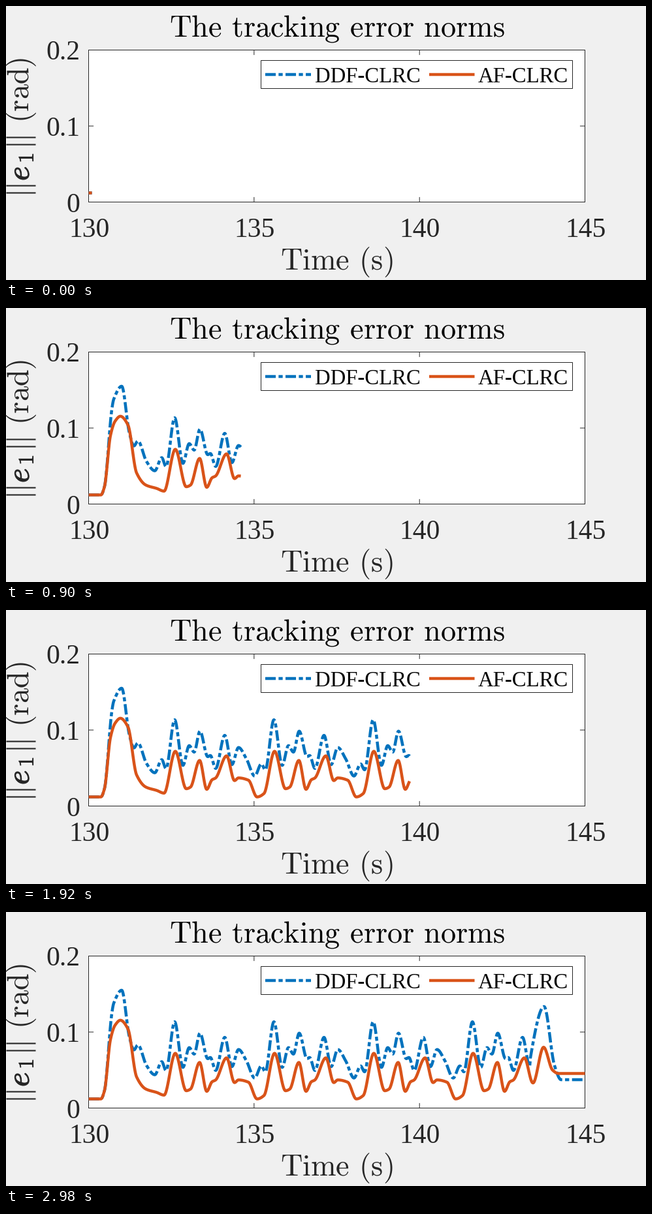
A matplotlib script that plays this animation: 980 px wide and 420 px high, repeating every 3 s.

```python
import numpy as np
import matplotlib.pyplot as plt
from matplotlib.animation import FuncAnimation
from matplotlib.patches import Rectangle
from matplotlib.patheffects import withStroke

W, H, DPI = 980, 420, 100
FRAMES, INTERVAL = 150, 20
LEFT, RIGHT, TOP, BOTTOM = 126.5, 886.5, 67.5, 300.5
SPAN, TOP_VALUE = 15, 0.2     # seconds and radians across the plot
PERIOD, CYCLES = 3, 4         # the tracked motion repeats every 3 s
SUB = 10                      # curve samples per frame
INK, BLUE, RED = "#262626", "#0072BD", "#D95319"
PX = 72 / DPI                 # one pixel in points
CURVE = 3.25
DASHDOT = (0, (3.55, 0.96, 1.4, 0.96))

plt.rcParams.update({
    "font.family": "Liberation Serif",
    "mathtext.fontset": "cm",
    "path.simplify": False,
})

# Turning points as (seconds after 130, radians)
REST = [(0, 0.012), (0.37, 0.012), (0.48, 0.023)]

RED_RISE = [(0.66, 0.09), (0.8, 0.109), (0.96, 0.1155), (1.19, 0.104),
            (1.45, 0.041), (1.73, 0.025), (2.06, 0.0205), (2.28, 0.017)]
RED_CYCLE = [(2.62, 0.072), (2.95, 0.0228), (3.08, 0.025), (3.355, 0.06),
             (3.57, 0.022), (3.73, 0.0345), (3.84, 0.037), (4.17, 0.066),
             (4.41, 0.0335), (4.53, 0.037), (4.83, 0.034), (5.09, 0.012),
             (5.3, 0.0165)]
RED_END = [(13.43, 0.033), (13.75, 0.08), (14.02, 0.05), (14.2, 0.0455),
           (15, 0.0455)]

BLUE_RISE = [(0.7, 0.124), (0.76, 0.138), (1, 0.155), (1.23, 0.094),
             (1.37, 0.0765), (1.49, 0.083), (1.75, 0.056), (2, 0.0438),
             (2.21, 0.061), (2.34, 0.0493)]
BLUE_CYCLE = [(2.6, 0.1135), (2.85, 0.0535), (3.04, 0.0795), (3.19, 0.071),
              (3.365, 0.0985), (3.6, 0.065), (3.68, 0.0665), (3.84, 0.0495),
              (4.115, 0.093), (4.33, 0.0545), (4.53, 0.077), (4.77, 0.062),
              (5.02, 0.0395), (5.22, 0.0554), (5.34, 0.0477)]
BLUE_END = [(13.35, 0.0657), (13.765, 0.1335), (14.08, 0.056),
            (14.28, 0.0373), (15, 0.0373)]


def sx(t):
    return LEFT + t * (RIGHT - LEFT) / SPAN


def sy(v):
    return BOTTOM - v * (BOTTOM - TOP) / TOP_VALUE


def ease_through(knots, x):
    """Monotone cubic easing from knot to knot, flat at every extreme."""
    kx, ky = np.array(knots).T
    h = np.diff(kx)
    d = np.diff(ky) / h
    prod = d[:-1] * d[1:]
    total = np.where(prod > 0, d[:-1] + d[1:], 1)
    m = np.concatenate([[0], np.where(prod > 0, 2 * prod / total, 0), [0]])
    i = np.clip(np.searchsorted(kx, x, side="right") - 1, 0, len(h) - 1)
    s = (x - kx[i]) / h[i]
    return (ky[i] * (1 + 2 * s) * (1 - s) ** 2
            + h[i] * m[i] * s * (1 - s) ** 2
            + ky[i + 1] * s ** 2 * (3 - 2 * s)
            + h[i] * m[i + 1] * s ** 2 * (s - 1))


def signal(rise, cycle, end, t):
    """Opening swing, repeated cycle, then settling."""
    loops = [(kt + k * PERIOD, v) for k in range(CYCLES) for kt, v in cycle]
    loops = [p for p in loops if p[0] < end[0][0]]
    return ease_through(REST + rise + loops + end, t)


ts = np.linspace(0, SPAN, FRAMES * SUB + 1)
xs = sx(ts)
red_y = sy(signal(RED_RISE, RED_CYCLE, RED_END, ts))
blue_y = sy(signal(BLUE_RISE, BLUE_CYCLE, BLUE_END, ts))

fig = plt.figure(figsize=(W / DPI, H / DPI), dpi=DPI, facecolor="#F0F0F0")
ax = fig.add_axes([0, 0, 1, 1])
ax.set(xlim=(0, W), ylim=(H, 0))
ax.axis("off")


def box(x0, y0, x1, y1, z):
    ax.add_patch(Rectangle((x0, y0), x1 - x0, y1 - y0, fc="white", ec=INK,
                           lw=PX, zorder=z, snap=False))


def stroke(x, y, color=INK, lw=PX, z=2, **kw):
    return ax.plot(x, y, color=color, lw=lw, zorder=z, snap=False,
                   solid_capstyle="butt", dash_capstyle="butt",
                   solid_joinstyle="round", **kw)[0]


def label(x, y, s, size, ha="center", color=INK, **kw):
    return ax.text(x, y, s, fontsize=size, ha=ha, va="baseline", color=color,
                   zorder=6, **kw)


def roman(s):
    return r"$\mathrm{%s}$" % s.replace(" ", r"\hspace{0.38}")


def bold(width):
    return [withStroke(linewidth=width, foreground=INK)]


# Plot frame, ticks and tick labels
box(LEFT, TOP, RIGHT, BOTTOM, 1)
TICK = 7.6
for t in range(0, SPAN + 1, 5):
    x = sx(t)
    stroke([x, x], [BOTTOM, BOTTOM - TICK])
    stroke([x, x], [TOP, TOP + TICK])
    label(x + 0.7, 354, str(130 + t), 30)
for s in ("0", "0.1", "0.2"):
    y = sy(float(s))
    stroke([LEFT, LEFT + TICK], [y, y])
    stroke([RIGHT, RIGHT - TICK], [y, y])
    label(113.5, y + 15, s, 30, ha="right")

# Title and axis labels
label(507, 46, roman("The tracking error norms"), 33.35, color="black")
label(506.5, 404, roman("Time (s)"), 33.35)

side = dict(ha="left", rotation=90, rotation_mode="anchor")
for y in (286.5, 275.5, 212.5, 201.5):
    stroke([0.5, 45.5], [y, y], lw=1.5)
label(35, 268, "$e$", 34.5, path_effects=bold(0.9), **side)
label(42, 241, r"$\mathbf{1}$", 24, path_effects=bold(0.4), **side)
label(35, 179, roman("(rad)"), 33.35, **side)

# Legend
box(390.5, 83.5, 867.5, 126.5, 4)
stroke([397, 467], [105, 105], BLUE, CURVE, 5, ls=DASHDOT)
stroke([648, 717.5], [105, 105], RED, CURVE, 5)
label(472.5, 117, "DDF-CLRC", 23.6, ha="left", color="black")
label(723, 117, "AF-CLRC", 23.6, ha="left", color="black")

blue = stroke([], [], BLUE, CURVE, 3, ls=DASHDOT)
red = stroke([], [], RED, CURVE, 3.5)


def update(i):
    n = (i + 1) * SUB + 1
    blue.set_data(xs[:n], blue_y[:n])
    red.set_data(xs[:n], red_y[:n])
    return blue, red


anim = FuncAnimation(fig, update, frames=FRAMES, interval=INTERVAL,
                     repeat=True, repeat_delay=0, blit=False)
plt.show()
```
